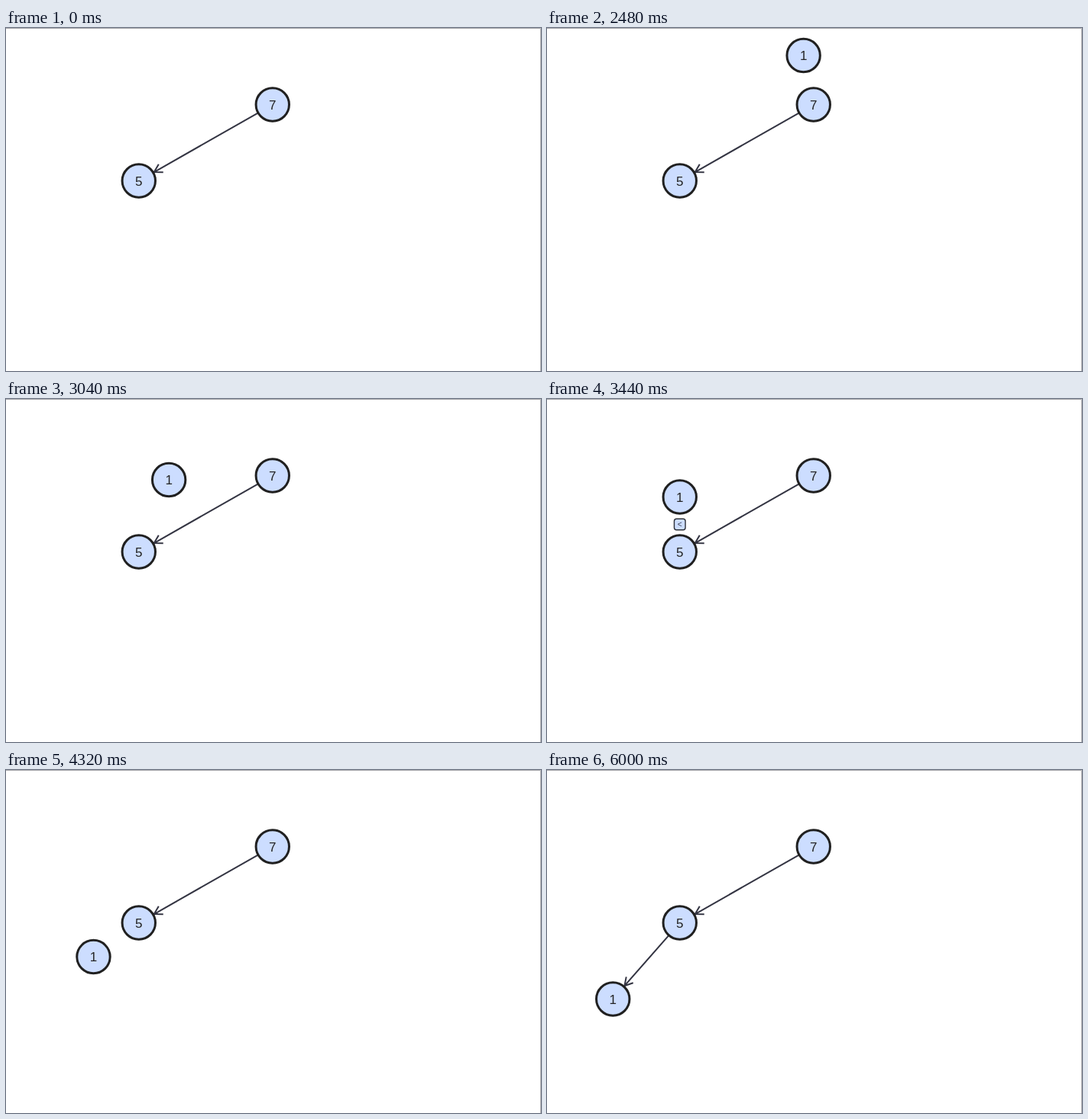
An HTML page that plays this animation: 700x450 px, repeating every 6.08 s.

```html
<!DOCTYPE html>
<html lang="en">
<head>
<meta charset="utf-8">
<title>Binary tree insertion</title>
<style>
  html, body { margin: 0; width: 100%; height: 100%; overflow: hidden; background: #fff; }
  svg { display: block; width: 100vw; height: 100vh; }
  .edge { fill: none; stroke: #333442; stroke-width: 2; }
  .node circle { fill: #ccddff; stroke: #202020; stroke-width: 3; }
  .compare rect { fill: #ccddff; stroke: #2c3038; stroke-width: 1.4; }
  text { font-family: "Liberation Sans", Arial, sans-serif; fill: #242424; text-anchor: middle; }
  .node text { font-size: 17px; }
  .compare text { font-size: 10px; fill: #333a48; }
</style>
</head>
<body>
<svg id="stage" viewBox="0 0 700 450">
  <path d="M0 .5H699.5V450" fill="none" stroke="#a8a8ac"/>
</svg>
<script>
const LOOP = 6080, TICK = 40, RADIUS = 21.7;
const stage = document.getElementById('stage');

const root = [348.75, 100.5], left = [173.75, 200.5], leaf = [86.25, 300.5];
const above = ([x, y], gap) => [x, y - gap];

function group(className, markup) {
  const g = document.createElementNS('http://www.w3.org/2000/svg', 'g');
  g.setAttribute('class', className);
  g.innerHTML = markup;
  return stage.appendChild(g);
}

function place(g, [x, y]) {
  g.setAttribute('transform', `translate(${x} ${y})`);
  return g;
}

function makeNode(label, at) {
  return place(group('node', `<circle r="${RADIUS}"/><text y="6">${label}</text>`), at);
}

function makeEdge([x1, y1], [x2, y2]) {
  const angle = Math.atan2(y2 - y1, x2 - x1);
  const polar = (x, y, a, r) => [x + r * Math.cos(a), y + r * Math.sin(a)];
  const start = polar(x1, y1, angle, RADIUS);
  const tip = polar(x2, y2, angle, -RADIUS - 1.3);
  const wing = side => polar(...tip, angle + side * Math.PI / 6, -12);
  return group('edge', `<path d="M${start}L${tip}M${wing(1)}L${tip}L${wing(-1)}"/>`);
}

function makeCompare(at) {
  return place(group('compare',
    '<rect x="-7.3" y="-7.3" width="14.6" height="14.6" rx="3"/><text y="3.5">&lt;</text>'), at);
}

makeEdge(root, left);
const newEdge = makeEdge(left, leaf);
makeNode(7, root);
makeNode(5, left);
const compareRoot = makeCompare(above(root, 36));
const compareLeft = makeCompare(above(left, 36));
const newNode = makeNode(1, above(root, 72));

const progress = (t, from, to) => Math.min(1, Math.max(0, (t - from) / (to - from)));
const mix = (a, b, p) => a.map((v, i) => v + (b[i] - v) * p);

function draw(t) {
  const fade = (g, from, to, end = LOOP) =>
    g.setAttribute('opacity', t < end ? progress(t, from, to) : 0);

  fade(newNode, 730, 1160);
  fade(compareRoot, 1730, 1920, 2430);
  fade(compareLeft, 3220, 3280, 3760);
  fade(newEdge, 4580, 4720);

  const toLeft = mix(above(root, 72), above(left, 72), progress(t, 2420, 3220));
  place(newNode, mix(toLeft, leaf, progress(t, 3778, 4578)));
}

const startTime = performance.now();
function frame() {
  const t = (performance.now() - startTime) % LOOP;
  draw(Math.floor(t / TICK) * TICK);
  requestAnimationFrame(frame);
}
frame();
</script>
</body>
</html>
```
